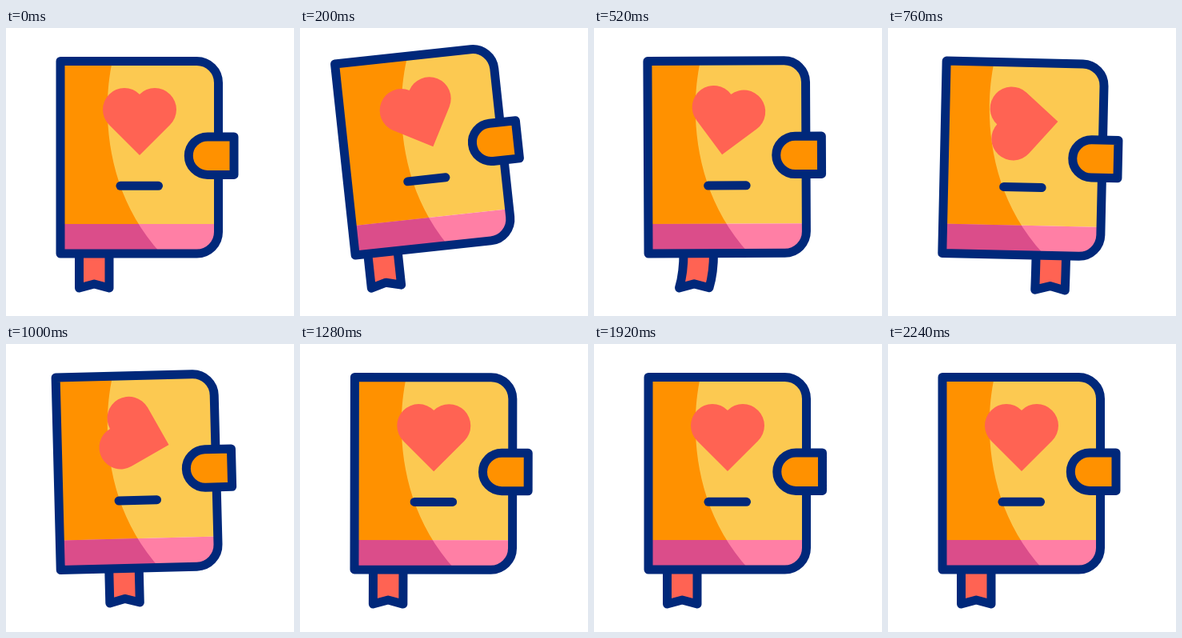
An HTML page with a canvas for the animation above (2.76 s loop, 360 by 360 pixels).

```html
<!DOCTYPE html>
<html lang="en">
<head>
<meta charset="utf-8">
<title>Diary</title>
<style>
  html, body { margin: 0; width: 100%; height: 100%; overflow: hidden; background: #fff; }
  canvas { display: block; }
</style>
</head>
<body>
<canvas width="360" height="360"></canvas>
<script>
const ctx = document.querySelector('canvas').getContext('2d');
const LOOP = 2760, STEP = 40;
const NAVY = '#00287a', CORAL = '#ff6353', ORANGE = '#ff9100', YELLOW = '#fcc951';
const ROSE = '#db4d8a', PINK = '#ff7fa5';
const PIVOT = [88, 272];

const sine = u => (1 - Math.cos(Math.PI * u)) / 2;
const cubic = u => u < .5 ? 4 * u ** 3 : 1 - 4 * (1 - u) ** 3;

// Each track is a list of [time, value] keys with one easing.
const tilt = [[0, 0], [260, -7], [380, -7], [625, 4], [915, -2.1], [1180, .6], [1380, -.4], [1540, 0]];
const nudge = [[0, 0], [240, -18], [320, -18]];
const spin = [[320, 0], [1280, 738]];
const slide = [[0, 0], [240, -8], [380, -8], [720, 94], [1240, 0]];
const bend = [[380, 0], [540, -6], [730, -1], [860, 4], [1000, 0], [1120, -2], [1300, 0], [1600, 3], [1900, 0]];
const pull = [[1280, 0], [1520, 12], [1660, 11], [1960, 0]];

function at(keys, t, ease = sine) {
  const i = keys.findIndex(k => k[0] > t);
  if (i === 0) return keys[0][1];
  if (i < 0) return keys[keys.length - 1][1];
  const [t0, a] = keys[i - 1], [t1, b] = keys[i];
  return a + (b - a) * ease((t - t0) / (t1 - t0));
}

function rotate(deg, [x, y]) {
  ctx.translate(x, y);
  ctx.rotate(deg * Math.PI / 180);
  ctx.translate(-x, -y);
}

function cover() {
  ctx.beginPath();
  ctx.roundRect(68, 41.5, 197.5, 240.5, [0, 27, 27, 0]);
}

function paint(page, band) {
  ctx.fillStyle = page;
  ctx.fillRect(60, 35, 215, 210);
  ctx.fillStyle = band;
  ctx.fillRect(60, 245, 215, 45);
}

function outlined(fill) {
  ctx.fillStyle = fill;
  ctx.fill();
  ctx.stroke();
}

function ribbon(x, lean) {
  const l = 91.5 + x, r = 129 + x;
  ctx.beginPath();
  ctx.moveTo(l, 280);
  ctx.quadraticCurveTo(l, 306, l + lean, 325);
  ctx.lineTo((l + r) / 2 + lean, 320);
  ctx.lineTo(r + lean, 325);
  ctx.quadraticCurveTo(r, 306, r, 280);
  ctx.closePath();
  outlined(CORAL);
}

function heart(deg) {
  ctx.save();
  ctx.translate(167, 117);
  ctx.rotate(deg * Math.PI / 180);
  ctx.beginPath();
  ctx.arc(-19, -15, 27, Math.PI * .75, -Math.PI / 4);
  ctx.arc(19, -15, 27, -Math.PI * .75, Math.PI / 4);
  ctx.lineTo(0, 42);
  ctx.fillStyle = CORAL;
  ctx.fill();
  ctx.restore();
}

function clasp(x) {
  ctx.beginPath();
  ctx.moveTo(285 + x, 136);
  ctx.arc(252 + x, 159.7, 23.7, -Math.PI / 2, Math.PI / 2, true);
  ctx.lineTo(285 + x, 183.4);
  ctx.closePath();
  outlined(ORANGE);
}

function draw(t) {
  const turn = at(tilt, t);
  ctx.fillStyle = '#fff';
  ctx.fillRect(0, 0, 360, 360);
  ctx.strokeStyle = NAVY;
  ctx.lineWidth = 11;
  ctx.lineCap = ctx.lineJoin = 'round';

  ctx.save();
  rotate(turn, PIVOT);
  ribbon(at(slide, t, cubic), at(bend, t));

  // The shaded side keeps its edge fixed while the book tilts.
  ctx.save();
  cover();
  ctx.clip();
  paint(YELLOW, PINK);
  ctx.resetTransform();
  ctx.beginPath();
  ctx.moveTo(0, 0);
  ctx.lineTo(142, 0);
  ctx.lineTo(133, 41);
  ctx.bezierCurveTo(120, 100, 122, 205, 194, 282);
  ctx.lineTo(222, 312);
  ctx.lineTo(0, 312);
  ctx.clip();
  rotate(turn, PIVOT);
  paint(ORANGE, ROSE);
  ctx.restore();

  heart(at(nudge, t) + at(spin, t, cubic));
  cover();
  ctx.stroke();
  ctx.beginPath();
  ctx.moveTo(143, 197.3);
  ctx.lineTo(190.5, 197.3);
  ctx.stroke();
  clasp(at(pull, t));
  ctx.restore();
}

const start = performance.now();
function frame() {
  const t = (performance.now() - start) % LOOP;
  draw(Math.floor(t / STEP) * STEP);
  requestAnimationFrame(frame);
}
frame();
</script>
</body>
</html>
```
